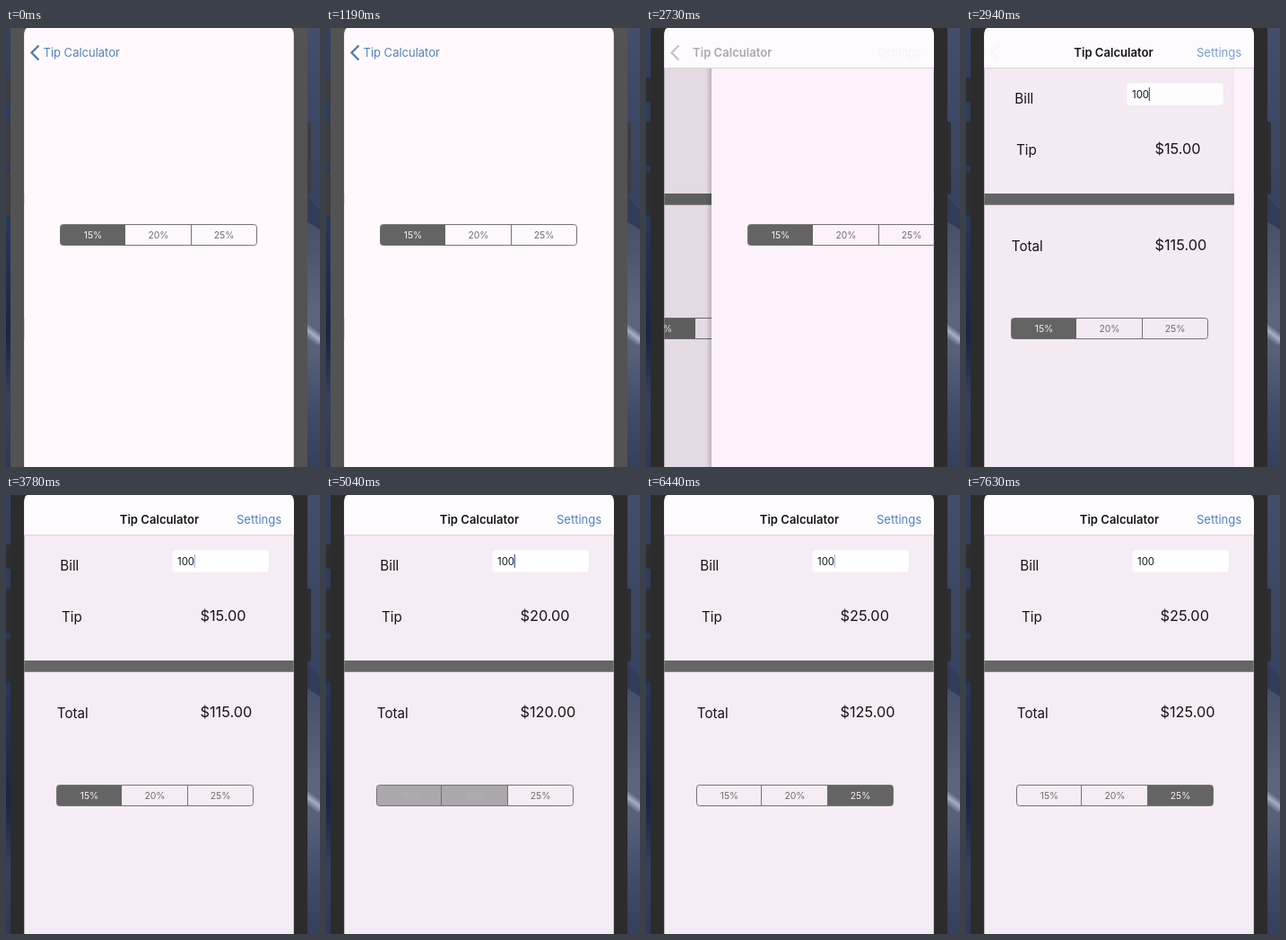
An HTML page that plays this animation: 350 px wide and 488 px high, repeating every 7.84 s.

```html
<!DOCTYPE html>
<html lang="en">
<head>
<meta charset="utf-8">
<title>Tip Calculator</title>
<style>
  html, body { margin: 0; width: 100%; height: 100%; overflow: hidden; background: #35415c; }
  svg { display: block; width: 100%; height: 100%; }
  text { font-family: Inter, "Open Sans", "Liberation Sans", sans-serif; }
  .nav { font-size: 13.1px; letter-spacing: -0.05px; }
  .title { font-size: 13.1px; font-weight: 600; }
  .label { font-size: 15.2px; fill: #161417; }
  .money { font-size: 16.3px; fill: #161417; }
  .entry { font-size: 11.4px; fill: #161417; }
  .seg text { font-size: 10.4px; text-anchor: middle; }
  .seg .frame { fill: none; stroke: #767276; }
</style>
</head>
<body>
<svg viewBox="0 0 350 488" preserveAspectRatio="none">
  <defs>
    <linearGradient id="sky" x2="0" y2="1">
      <stop offset="0" stop-color="#434e6a"/>
      <stop offset=".4" stop-color="#36425f"/>
      <stop offset=".45" stop-color="#465069"/>
      <stop offset=".66" stop-color="#5c667f"/>
      <stop offset=".74" stop-color="#566079"/>
      <stop offset=".88" stop-color="#404b66"/>
      <stop offset="1" stop-color="#343f5b"/>
    </linearGradient>
    <linearGradient id="dusk" x2="0" y2="1">
      <stop offset="0" stop-color="#34425f"/>
      <stop offset=".45" stop-color="#28365a"/>
      <stop offset=".7" stop-color="#172647"/>
      <stop offset=".85" stop-color="#35425f"/>
      <stop offset="1" stop-color="#2d3955"/>
    </linearGradient>
    <linearGradient id="ridge" x2="0" y2="1">
      <stop offset="0" stop-color="#a6aec0" stop-opacity="0"/>
      <stop offset=".45" stop-color="#a6aec0"/>
      <stop offset="1" stop-color="#a6aec0" stop-opacity="0"/>
    </linearGradient>
    <linearGradient id="edge">
      <stop offset="0" stop-color="#000" stop-opacity="0"/>
      <stop offset="1" stop-color="#000" stop-opacity=".22"/>
    </linearGradient>
    <clipPath id="glass"><path d="M20.3 488V8Q20.3 2 23.5 0H317.5Q320.8 2 320.8 8V488Z"/></clipPath>
    <clipPath id="pill"><rect width="219" height="23" rx="3"/></clipPath>
  </defs>

  <rect width="20" height="488" fill="url(#dusk)"/>
  <rect x="325" width="25" height="488" fill="url(#sky)"/>
  <path d="M334 186L350 202V224L334 214Z" fill="#303c58"/>
  <rect x="330" y="334" width="24" height="14" fill="url(#ridge)" transform="rotate(37 342 341)"/>

  <g id="buttons">
    <rect x="-2" y="55" width="9" height="27" rx="2"/>
    <rect x="-2" y="104" width="9" height="49" rx="2"/>
    <rect x="-2" y="160" width="9" height="48" rx="2"/>
    <rect x="332" y="104" width="8" height="81" rx="2"/>
  </g>
  <rect id="bezel" x="5" y="-10" width="331" height="510"/>

  <g clip-path="url(#glass)">
    <g id="main">
      <rect x="20" width="301" height="488" fill="#f6ecf5"/>
      <text class="label" x="60.3" y="84">Bill</text>
      <text class="label" x="62" y="141">Tip</text>
      <text class="label" x="56.8" y="248.3">Total</text>
      <rect x="185.3" y="61.3" width="107.4" height="24.4" rx="4" fill="#fff"/>
      <text class="entry" x="191" y="77.5">100</text>
      <rect id="caret" x="209.7" y="66" width="1.3" height="15" fill="#4664c0"/>
      <text id="tip" class="money" x="216.5" y="140.2"></text>
      <text id="total" class="money" x="216.5" y="246.6"></text>
      <rect x="-80" y="184" width="480" height="12.7" fill="#656565"/>
      <g id="rates" class="seg" transform="translate(56.5 322.5)"></g>
    </g>
    <rect id="dim" x="20" width="301" height="488"/>

    <g id="page">
      <rect id="shadow" x="14" width="6" height="488" fill="url(#edge)"/>
      <rect id="paper" x="20" width="301" height="488"/>
      <g id="defaults" class="seg" transform="translate(60.5 218.5)"></g>
    </g>

    <g id="bar">
      <rect x="20" width="301" height="44.5" fill="#fefbfe"/>
      <path d="M20 44.5H321" stroke="#dcd4dc"/>
    </g>
    <path id="chevron" d="M36.5 19.5L28.5 27.5L36.5 35.5" fill="none" stroke-width="2.2"/>
    <text id="back" class="nav" y="32" fill="#5880b6">Tip Calculator</text>
    <text id="title" class="title" y="32" fill="#161417">Tip Calculator</text>
    <text id="settings" class="nav" x="257" y="32" fill="#4b83c4">Settings</text>
  </g>
</svg>
<script>
const LOOP = 7840, STEP = 70, BLINK = 1050;
const RATES = [15, 20, 25], BILL = 100;
const EDGES = [0, 72.5, 146, 219];
const $ = id => document.getElementById(id);
const clamp = v => Math.max(0, Math.min(1, v));
const mix = (a, b, k) => a + (b - a) * k;
const set = (id, attrs) => {
  for (const key in attrs) $(id).setAttribute(key, attrs[key]);
};

function buildSegments(id) {
  const cells = RATES.map((_, i) =>
    `<rect x="${EDGES[i]}" width="${EDGES[i + 1] - EDGES[i]}" height="23"/>`).join('');
  const labels = RATES.map((rate, i) =>
    `<text x="${36.5 + 73 * i}" y="15.5">${rate}%</text>`).join('');
  $(id).innerHTML = `<path class="frame" d="M72 0V23M146 0V23"/>
    <g clip-path="url(#pill)">${cells}</g>${labels}
    <rect class="frame" width="219" height="23" rx="3"/>`;
}

function paintSegments(id, levels, pressed = -1) {
  const cells = $(id).querySelectorAll('g rect');
  const labels = $(id).querySelectorAll('text');
  levels.forEach((k, i) => {
    const press = i === pressed;
    cells[i].setAttribute('fill', press ? '#d9cfd9' : '#646464');
    cells[i].setAttribute('fill-opacity', press ? 1 : k);
    const c = Math.round(mix(112, 246, k));
    labels[i].setAttribute('fill', `rgb(${c},${c - 3},${c})`);
  });
}

// Critically damped spring for the page sliding away
function slide(t) {
  const x = Math.max(0, t - 2685) * 0.0169;
  return 1 - (1 + x) * Math.exp(-x);
}

function caretAlpha(t) {
  const u = (t - 4760 + 5 * BLINK) % BLINK;
  return u < 490 ? clamp((u + 40) / 250) : clamp(1 - (u - 420) / 350);
}

// Each tap: finger down, then a crossfade after release
const TAPS = [{ down: 4830, up: 4970 }, { down: 5880, up: 6020 }];

function rateState(t) {
  const fades = TAPS.map(tap => t < tap.up ? 0 : clamp((t - tap.up + STEP) / 280));
  return {
    levels: [1 - fades[0], fades[0] * (1 - fades[1]), fades[1]],
    pressed: TAPS.findIndex(tap => t >= tap.down && t < tap.up) + 1 || -1,
    chosen: TAPS.filter(tap => t >= tap.up).length
  };
}

function render(t) {
  const p = slide(t), dark = t >= 2450, held = t >= 2590;
  set('bezel', { fill: dark ? '#2c2c2d' : '#535353' });
  set('buttons', { fill: dark ? '#2d2e33' : '#3c3d42' });
  set('paper', { fill: dark ? '#fdf2fc' : '#fff9fd' });
  set('bar', { opacity: dark ? 1 : 0 });

  set('main', { transform: `translate(${Math.round(-90 * (1 - p))} 0)` });
  set('dim', { opacity: 0.09 * (1 - p) });
  set('page', {
    transform: `translate(${Math.round(300 * p)} 0)`,
    visibility: t < 3360 ? 'visible' : 'hidden'
  });
  set('shadow', { opacity: 1 - p });

  set('chevron', { stroke: held ? '#b9b2c6' : '#4a78b4', opacity: 1 - p });
  set('back', { opacity: (held ? 0.5 : 1) * clamp(1 - p * 6), x: 41.5 + 85 * p });
  set('title', { opacity: clamp(p * 2), x: mix(36, 126.8, p) });
  set('settings', { opacity: Math.pow(p, 1.5) * (p < 0.97 ? 0.85 : 1) });

  const rates = rateState(t), tip = BILL * RATES[rates.chosen] / 100;
  $('tip').textContent = '$' + tip.toFixed(2);
  $('total').textContent = '$' + (BILL + tip).toFixed(2);
  set('caret', { opacity: caretAlpha(t) });
  paintSegments('rates', rates.levels, rates.pressed);
}

buildSegments('rates');
buildSegments('defaults');
paintSegments('defaults', [1, 0, 0]);

const start = performance.now();
function tick() {
  const t = (performance.now() - start) % LOOP;
  render(Math.floor(t / STEP) * STEP);
  requestAnimationFrame(tick);
}
tick();
</script>
</body>
</html>
```
